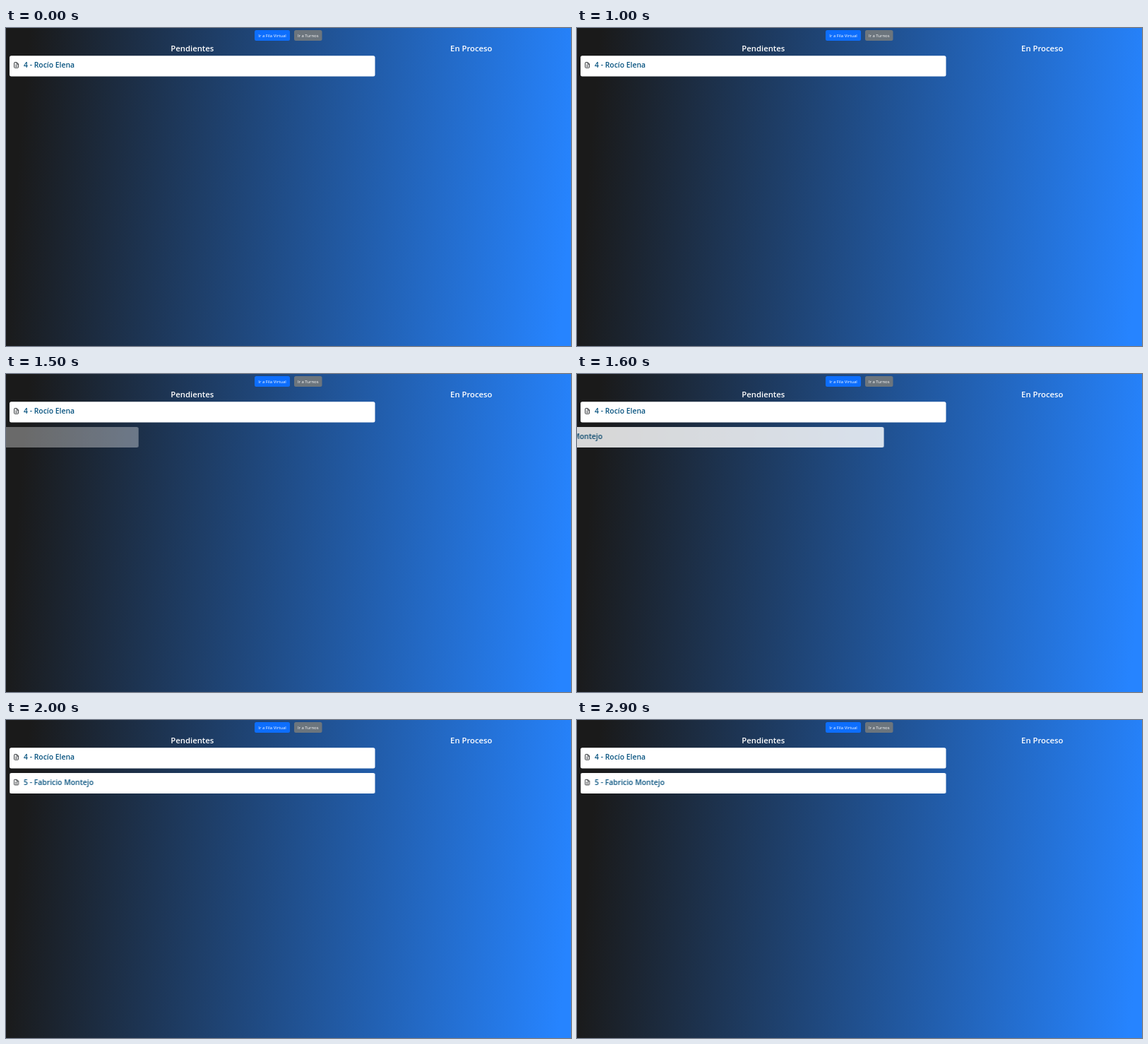
An HTML page that plays this animation: 800x450 px, repeating every 3 s.

```html
<!DOCTYPE html>
<html lang="es">
<head>
<meta charset="utf-8">
<title>Turnos</title>
<style>
  html, body { margin: 0; width: 100%; height: 100%; overflow: hidden; }
  body { background: linear-gradient(95deg, #1a1a1a 4%, #2684ff 98%); }
  svg { display: block; width: 800px; height: 450px; }
  text { font-family: "Open Sans", "Noto Sans", sans-serif; fill: #fff; }
  .btn { font-size: 5.95px; text-anchor: middle; }
  .head { font-size: 11.3px; font-weight: 600; text-anchor: middle; }
  .name { font-size: 10.4px; font-weight: 600; fill: #06527f; }
  .icon path { fill: none; stroke: #212529; stroke-width: .9; stroke-linejoin: round; }
  .icon .lines { stroke-width: .7; }
</style>
</head>
<body>
<svg viewBox="0 0 800 450">
  <defs>
    <g id="card">
      <rect width="517.5" height="29.2" rx="2.5" fill="#fff"/>
      <g class="icon">
        <path d="M7 9.4H10.3L12.6 11.7V16.2Q12.6 17 11.8 17H7.4Q6.6 17 6.6 16.2V10.2Q6.6 9.4 7.4 9.4M10.2 9.4V11.8H12.6"/>
        <path class="lines" d="M8 13.4H11.2M8 15.1H11.2"/>
      </g>
    </g>
  </defs>

  <rect x="352" y="3" width="50" height="15" rx="2.5" fill="#0d6efd"/>
  <text class="btn" x="377" y="13.2">Ir a Fila Virtual</text>
  <rect x="408" y="3" width="39.5" height="15" rx="2.5" fill="#6c757d"/>
  <text class="btn" x="427.7" y="13.2">Ir a Turnos</text>

  <text class="head" x="263.8" y="33.2">Pendientes</text>
  <text class="head" x="658.8" y="33.2">En Proceso</text>

  <g transform="translate(5 39.3)">
    <use href="#card"/>
    <text class="name" x="20" y="17.2">4 - Rocío Elena</text>
  </g>
  <g transform="translate(5 74.9)">
    <g id="next" opacity="0">
      <use href="#card"/>
      <text class="name" x="20" y="17.2">5 - Fabricio Montejo</text>
    </g>
  </g>
</svg>
<script>
  const LOOP = 3000, WIDTH = 517.5;
  // [time in ms, share of the slide-in done]
  const steps = [[0, 0], [1500, .353], [1600, .83], [1700, .985], [1800, 1], [LOOP, 1]];

  document.getElementById("next").animate(
    steps.map(([ms, p]) => ({
      offset: ms / LOOP,
      transform: `translateX(${(p - 1) * WIDTH}px)`,
      opacity: p,
      easing: "steps(1, end)"
    })),
    { duration: LOOP, iterations: Infinity }
  );
</script>
</body>
</html>
```
